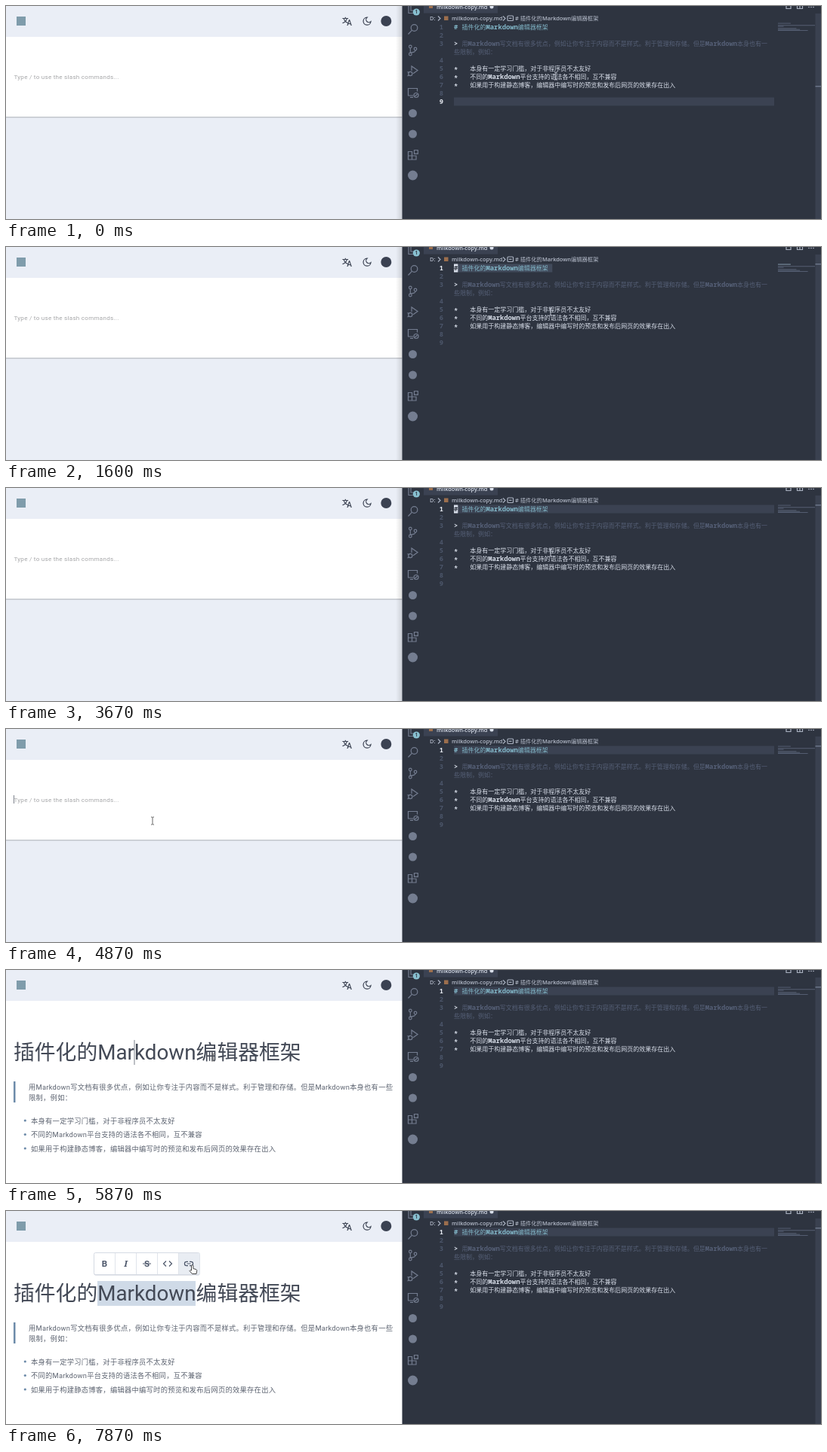
Write an HTML page that moves like this. It is 1079 by 283 pixels and loops after 8000 ms.

```html
<!DOCTYPE html>
<html lang="zh">
<head>
<meta charset="utf-8">
<style>
html, body { margin: 0; width: 100%; height: 100%; overflow: hidden; background: #2e3440; }
svg { display: block; width: 100vw; height: 100vh; }
text { white-space: pre; }
.cjk { font-family: "Noto Sans CJK SC", "Noto Sans CJK", sans-serif; }
.code { font: 600 8.8px "Noto Sans Mono", monospace; }
.code .cjk { font-size: 8px; font-weight: 400; }
.ui { font: 600 7.4px "Open Sans", sans-serif; }
.ui .cjk { font-size: 7.3px; font-weight: 400; }
.title { font: 400 27.8px Roboto, sans-serif; fill: #434956; }
.title .cjk { font-weight: 300; }
.body { font: 400 9.27px Roboto, sans-serif; letter-spacing: .27px; fill: #5c6370; }
.hint { font: 400 8.1px Roboto, sans-serif; letter-spacing: .25px; fill: #a6a7a9; }
.line { fill: none; stroke: currentColor; stroke-width: 1.2; }
</style>
</head>
<body>
<svg viewBox="0 0 1079 283" preserveAspectRatio="none">
  <defs>
    <linearGradient id="shade"><stop offset="0" stop-color="#000" stop-opacity="0"/><stop offset="1" stop-color="#000" stop-opacity=".13"/></linearGradient>
  </defs>

  <!-- browser -->
  <rect width="525" height="283" fill="#eaeef6"/>
  <rect id="page" y="41" width="524.5" fill="#fff"/>
  <rect id="pageEdge" y="147" width="524.5" height="1.5" fill="#c3c6cc"/>
  <rect x="14" y="14" width="12" height="12" fill="#7f9cab"/>
  <g fill="#3b4252" color="#3b4252">
    <text class="cjk" x="445" y="22" font-size="8.5" font-weight="700">文</text>
    <text x="451.2" y="26" font-family="Roboto, sans-serif" font-size="10" font-weight="500">A</text>
    <path class="line" d="M478 15.2a5 5 0 1 0 5 5.6a3.4 3.4 0 0 1-5-5.6z"/>
    <circle cx="503.3" cy="20" r="7"/>
  </g>
  <g id="hint"></g>
  <rect id="titleSel" x="121" y="93" width="130" height="33" fill="#cfdae7"/>
  <g id="doc"><rect x="10" y="148" width="2.5" height="28" fill="#6d8ba9"/></g>
  <rect id="caret" width="1" fill="#7d828c"/>
  <g id="bar" color="#4c566a" fill="#4c566a">
    <rect x="116.5" y="56.5" width="140" height="29" rx="2" fill="#c9ced8"/>
    <rect x="116.5" y="55.5" width="140" height="29" rx="2" fill="#fff" stroke="#d5dae3"/>
    <rect id="hover" y="56" width="27.5" height="28" fill="#e9edf3"/>
    <path d="M144.5 56v28M172.5 56v28M200.5 56v28M228.5 56v28" stroke="#e0e4eb"/>
    <g font-family="Roboto, sans-serif" font-weight="700" font-size="11.5" text-anchor="middle">
      <text x="130.5" y="74">B</text>
      <text x="158.5" y="74" font-family="Noto Serif, serif" font-style="italic">I</text>
      <text x="186.5" y="74">S</text>
    </g>
    <path class="line" d="M181 70h11M212 66.5l-3.5 3.5 3.5 3.5M216 66.5l3.5 3.5-3.5 3.5M241 67.4h-2a2.6 2.6 0 0 0 0 5.2h2M243 67.4h2a2.6 2.6 0 0 1 0 5.2h-2M239.5 70h5"/>
  </g>
  <rect id="shadow" x="516" width="9" height="283" fill="url(#shade)"/>

  <!-- editor -->
  <rect x="524.5" width="555" height="283" fill="#2e3440"/>
  <rect x="553" width="98" height="9.5" fill="#3b4252"/>
  <rect x="1071.5" y="10" width="7.5" height="273" fill="#3a4150"/>
  <g fill="#747d90" color="#747d90">
    <path class="line" d="M533 0v9.5h7M536 0v6h5"/>
    <g class="line">
      <circle cx="540.5" cy="29" r="4.3"/><path d="M537.5 32.2l-5 5.3"/>
      <circle cx="535.3" cy="54" r="1.8"/><circle cx="535.3" cy="64" r="1.8"/><circle cx="542" cy="57" r="1.8"/>
      <path d="M535.3 56v6M542 59q0 2.5-6.5 3"/>
      <path d="M537 86v-6l8 5.5-6 4.2"/><circle cx="535.3" cy="90" r="2.6"/><path d="M531.5 87.5l2 1M531.5 93l2-1"/>
      <path d="M539 119h-6.500v-9.500h12v4M535 121.300h4"/><circle cx="543" cy="118.500" r="3"/><path d="M541.500 120l3-3"/>
      <path d="M532.500 193.500h5v10.500h-5zM532.500 199h10.500v5h-10.500M540.500 191.500h4.800v4.800h-4.800z"/>
    </g>
    <circle cx="538.5" cy="142.500" r="5.500"/><circle cx="538.5" cy="170" r="5.500"/><circle cx="538.5" cy="225" r="6.500"/>
  </g>
  <circle cx="543.3" cy="8" r="4.6" fill="#88c0d0"/>
  <text class="ui" x="543.3" y="10.300" font-size="6" text-anchor="middle" fill="#2e3440">1</text>
  <g color="#a9b1c0" class="line" stroke-width="1">
    <path d="M572 13.500l3 3-3 3M658 13.500l3 3-3 3"/>
    <rect x="664" y="13" width="7.500" height="6.500" rx="1"/><path d="M666 16.300h3.500"/>
    <path d="M1033 0v3.500h6V0M1047.500 0v3.500h7V0M1051 0v3.500"/>
  </g>
  <g fill="#9c6f4d"><rect x="580" y="13.500" width="5.500" height="5.500"/><rect x="560" y="0" width="5" height="3"/></g>
  <circle cx="643" cy="1" r="2.500" fill="#d8dee9"/>
  <g fill="#b9c0cd"><circle cx="1063" cy="1.500" r=".8"/><circle cx="1066" cy="1.500" r=".8"/><circle cx="1069" cy="1.500" r=".8"/></g>
  <rect id="band" x="593" width="424" height="11" fill="#3b4252"/>
  <g id="sel" fill="#414a5b"></g>
  <g id="code"></g>
  <g id="mini"></g>
  <rect id="ruler" x="1071.500" width="7.500" height="1.500" fill="#6b7588"/>
  <rect id="block" y="22.500" width="5.300" height="11" fill="#d8dee9"/>
  <g id="blockChar"></g>
  <rect id="thin" x="593" width="1.300" height="11" fill="#d8dee9"/>

  <!-- pointers -->
  <path id="beam" d="M-2-5h1.500l.5.500.500-.500H2M0-4.500v9M-2 5h1.500l.5-.5.500.500H2" fill="none" stroke-width=".9"/>
  <path id="hand" d="M-1.500 1V-5.500q1.200-1.500 2.400 0V-1.500l4 1.200q1 .5.800 1.800L5 5.500H-.500L-4 1.500q.5-1.500 2.500-.5z" fill="#fff" stroke="#333" stroke-width=".9"/>
</svg>
<script>
const $ = id => document.getElementById(id);
const NS = "http://www.w3.org/2000/svg";
const GLYPHS = /[\u3000-\u9fff\uff00-\uffef]+|[^\u3000-\u9fff\uff00-\uffef]+/g;

function add(parent, tag, attrs) {
  const el = document.createElementNS(NS, tag);
  for (const k in attrs) el.setAttribute(k, attrs[k]);
  return parent.appendChild(el);
}
function put(parent, cls, x, y, str, attrs) {
  const el = add(parent, "text", { class: cls, x, y, ...attrs });
  for (const run of str.match(GLYPHS))
    add(el, "tspan", run[0] >= "\u3000" ? { class: "cjk" } : {}).textContent = run;
  return el;
}
const set = (id, attrs) => { for (const k in attrs) $(id).setAttribute(k, attrs[k]); };
const show = (id, on) => { $(id).style.display = on ? "" : "none"; };

const heading = "插件化的Markdown编辑器框架";
const quote = "用Markdown写文档有很多优点，例如让你专注于内容而不是样式。利于管理和存储。但是Markdown本身也有一";
const items = ["本身有一定学习门槛，对于非程序员不太友好",
  "不同的Markdown平台支持的语法各不相同，互不兼容",
  "如果用于构建静态博客，编辑器中编写时的预览和发布后网页的效果存在出入"];

// rendered document
put($("hint"), "hint", 10.5, 97, "Type / to use the slash commands...");
put($("doc"), "title", 10, 119, heading);
put($("doc"), "body", 30, 158.5, quote + "些");
put($("doc"), "body", 30, 172.5, "限制，例如：");
items.forEach((s, i) => {
  add($("doc"), "circle", { cx: 25.3, cy: 200 + i * 18.5, r: 1.6, fill: "#6d8ba9" });
  put($("doc"), "body", 33, 203.5 + i * 18.5, s);
});

// Markdown rows: [line number, text]
const rows = [[1, "# " + heading], [2, ""], [3, "> " + quote], [0, "些限制，例如："], [4, ""],
  ...items.map((s, i) => [5 + i, "*   " + s]), [8, ""], [9, ""]];
const rowY = i => 28 + i * 11;
const lineRow = n => rows.findIndex(r => r[0] === n);
const widthOf = s => [...s].reduce((w, c) => w + (c >= "\u3000" ? 8 : 5.3), 0);
const numbers = [], selRects = [], miniRects = [];

rows.forEach(([n, s], i) => {
  const y = rowY(i) + 3, dim = i === 2 || i === 3;
  if (n) numbers[n] = put($("code"), "code", 579, y, "" + n, { "text-anchor": "end" });
  const fill = i === 0 ? "#82b7c8" : dim ? "#566077" : "#d8dee9";
  if (s) {
    const mark = s.match(/^[>*] */)?.[0] ?? "";
    if (mark) put($("code"), "code", 593, y + (s[0] === "*" ? 1.5 : 0), s[0], { fill: "#d8dee9" });
    put($("code"), "code", 593 + widthOf(mark), y, s.slice(mark.length), { fill });
    miniRects.push(add($("mini"), "rect", { x: 1022, y: 22.6 + i * 1.35, width: Math.min(49, widthOf(s) * .135), height: .9 }));
  }
  if (i < 8) selRects.push(add($("sel"), "rect", { x: 593, y: rowY(i) - 5.5, width: Math.min(415, widthOf(s) + 5.3), height: 11 }));
});
put($("code"), "ui", 570, 3.5, "milkdown-copy.md", { fill: "#d8dee9" });
[[561, "D:"], [590, "milkdown-copy.md"], [674, "# " + heading]]
  .forEach(([x, s]) => put($("code"), "ui", x, 19.2, s, { fill: "#b4bbc9" }));
const blockChar = put($("blockChar"), "code", 0, 31, "#", { fill: "#2e3440" });

// pointer path: [ms, x, y]
const path = [[0, 728, 93], [70, 728, 93], [440, 645, 30], [530, 645, 30], [870, 721, 86],
  [4000, 721, 86], [4670, 194, 122], [5130, 194, 122], [5600, 170, 110], [5730, 170, 110],
  [6030, 308, 118], [6360, 95, 112], [6600, 169, 101], [6800, 169, 101], [7530, 215, 73],
  [7600, 217, 73], [7870, 247, 78], [8000, 247, 78]];
function pointer(t) {
  const i = path.findIndex((p, k) => k && t <= p[0]);
  const [a, x, y] = path[i - 1], [b, u, v] = path[i];
  const f = (t - a) / (b - a), e = f * f * (3 - 2 * f);
  return [x + (u - x) * e, y + (v - y) * e];
}

const CLICK = 470, HOME = 1070, SELECT = 1550, ALL = 1930, UP = 2270, YANK = 3670,
  FOCUS = 4650, PASTE = 5000, PLACE = 5660, WORD = 6800;

function draw(t) {
  // editor state
  const selecting = t >= SELECT && t < YANK, all = selecting && t >= ALL;
  const line = t < CLICK ? 9 : all ? (t < UP ? 9 : 8) : 1;
  const y = rowY(lineRow(line)) - 5.5;
  show("band", !selecting);
  set("band", { y });
  set("thin", { y });
  set("ruler", { y: 22 + (line - 1) * 10.5 });
  show("thin", all);
  selRects.forEach((r, i) => r.style.display = all || (selecting && i === 0) ? "" : "none");
  miniRects.forEach((r, i) => r.setAttribute("fill", all || (selecting && i === 0) ? "#8fa5b8" : "#596377"));
  numbers.forEach((el, n) => el.setAttribute("fill", n === line ? "#e5e9f0" : "#4c566a"));
  const block = t >= CLICK && t < FOCUS && !all;
  const bx = t < HOME ? 640.9 : 593;
  show("block", block);
  show("blockChar", block);
  set("block", { x: bx });
  blockChar.setAttribute("x", bx);
  blockChar.firstChild.textContent = t < HOME ? "a" : "#";

  // browser state
  const pasted = t >= PASTE, word = t >= WORD;
  show("shadow", t < FOCUS);
  show("hint", !pasted);
  show("pageEdge", !pasted);
  show("doc", pasted);
  set("page", { height: pasted ? 242 : 106 });
  show("titleSel", word);
  show("bar", word);
  show("caret", t >= FOCUS && !word);
  set("caret", !pasted ? { x: 10, y: 88, height: 11 }
    : t < PLACE ? { x: 357, y: 231.5, height: 11 } : { x: 169.5, y: 93, height: 33 });

  // pointer
  const [px, py] = pointer(Math.min(8000, Math.ceil(t / (200 / 3)) * 200 / 3));
  const onBar = word && px > 116 && px < 257 && py > 55 && py < 85;
  const move = { transform: `translate(${px} ${py})` };
  show("hover", onBar);
  set("hover", { x: 117 + 28 * Math.floor((px - 116.5) / 28) });
  set("beam", { ...move, stroke: px > 524 ? "#d8dee9" : "#555" });
  set("hand", move);
  show("beam", !onBar);
  show("hand", onBar);
}

const start = performance.now();
function tick() {
  draw((performance.now() - start) % 8000);
  requestAnimationFrame(tick);
}
draw(0);
requestAnimationFrame(tick);
</script>
</body>
</html>
```
